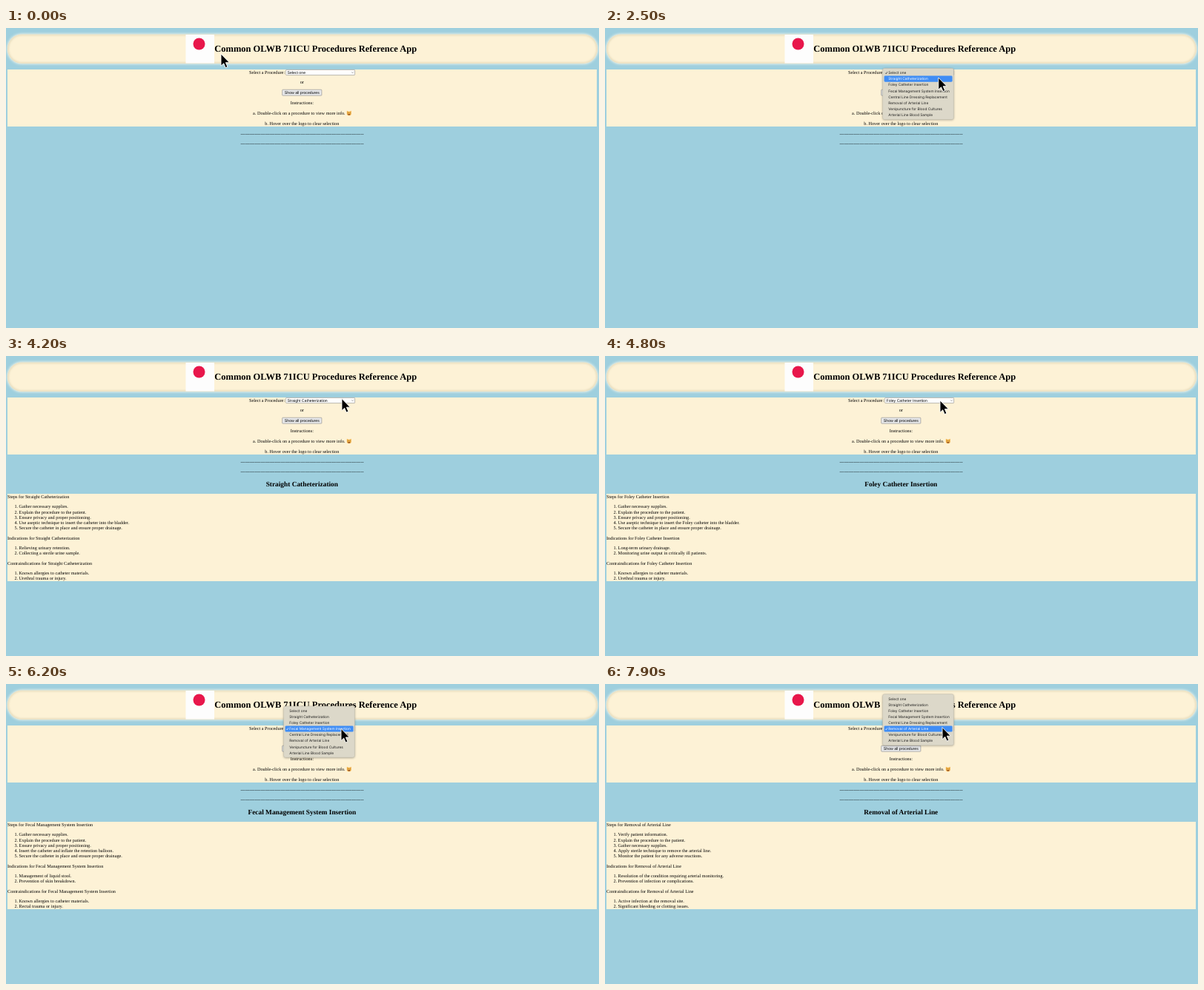
An HTML page that plays this animation: 800 by 405 pixels, repeating every 8000 ms.

```html
<!DOCTYPE html>
<html lang="en">
<head>
<meta charset="utf-8">
<title>Procedures Reference App</title>
<style>
  html, body { margin: 0; width: 100%; height: 100%; overflow: hidden; background: #9ecfde; }
  svg { display: block; width: 800px; height: 405px; }
  text { font: 6.24px "Liberation Serif", Times, serif; text-rendering: geometricPrecision; white-space: pre; }
  .mid { text-anchor: middle; }
  .h1 { font-size: 12.48px; font-weight: bold; }
  .h2 { font-size: 9.36px; font-weight: bold; }
  .ui { font: 5.2px "Liberation Sans", Arial, sans-serif; }
  .menu text { font: 4.8px Inter, sans-serif; }
  .panel { fill: #fdf2d6; }
</style>
</head>
<body>
<svg viewBox="0 0 800 405">
  <defs>
    <filter id="soft" x="-10%" y="-30%" width="120%" height="160%"><feGaussianBlur stdDeviation="1.5"/></filter>
    <clipPath id="pill"><rect x="2" y="8.5" width="796" height="39.5" rx="19.7"/></clipPath>
  </defs>
  <rect width="800" height="405" fill="#9ecfde"/>

  <rect x="1" y="7.5" width="798" height="41.5" rx="20.5" fill="#e6eee6" filter="url(#soft)"/>
  <g clip-path="url(#pill)">
    <rect class="panel" x="2" y="8.5" width="796" height="39.5"/>
    <rect x="2" y="8.5" width="796" height="39.5" rx="19.7" fill="none" stroke="#d9cfae" stroke-width="2" filter="url(#soft)"/>
  </g>
  <rect x="242.5" y="9" width="38.5" height="38.5" fill="#fdfdfd"/>
  <circle cx="260.5" cy="21.5" r="8" fill="#e8174b"/>
  <text class="h1" x="281.3" y="32.4">Common OLWB 71ICU Procedures Reference App</text>

  <rect class="panel" x="2" y="56" width="795" height="77"/>
  <text x="328" y="62">Select a Procedure:</text>
  <rect id="box" x="377.6" y="56.4" width="93" height="7.2" rx=".8" fill="#fff"/>
  <text id="value" class="ui" x="379.5" y="61.8"></text>
  <path d="M466.2 59.4l1.3 1.4 1.3-1.4" fill="none" stroke="#555" stroke-width=".5"/>
  <text class="mid" x="399.3" y="75.4">or</text>
  <rect x="372.7" y="83.2" width="53.2" height="8" rx=".8" fill="#e7e8ea" stroke="#767676" stroke-width=".5"/>
  <text class="ui mid" x="399.3" y="89.1">Show all procedures</text>
  <text class="mid" x="399.3" y="103.3">Instructions:</text>
  <text x="333" y="117.3">a. Double-click on a procedure to view more info.</text>
  <g transform="translate(462.8 115.2)">
    <path d="M-3 0L-2.9-3.4-.9-2.5H.9L2.9-3.4 3 0Q3 3 0 3T-3 0z" fill="#eeae45"/>
    <path d="M-1.9-.4q.5-.8 1 0M.9-.4q.5-.8 1 0" fill="none" stroke="#5a3a18" stroke-width=".5"/>
    <path d="M-1.7.8H1.7Q1.2 2.3 0 2.3T-1.7.8z" fill="#8a4a2a"/>
  </g>
  <text class="mid" x="399.3" y="131.3">b. Hover over the logo to clear selection</text>
  <text class="mid rule" x="399.5" y="144.5"></text>
  <text class="mid rule" x="399.5" y="157.9"></text>

  <g id="details"></g>
  <g id="menu" class="menu"></g>
  <path id="cursor" d="M0 0V16.2L3.7 12.8 6.2 18.6 8.9 17.4 6.4 11.7H11.4z" fill="#000" stroke="#fff" stroke-width=".9" stroke-linejoin="round"/>
</svg>
<script>
const LOOP = 8000, STEP = 100, ROW = 8.14, TOP = 56.4;
const $ = id => document.getElementById(id);

const names = ['Select one', 'Straight Catheterization', 'Foley Catheter Insertion',
  'Fecal Management System Insertion', 'Central Line Dressing Replacement',
  'Removal of Arterial Line', 'Venipuncture for Blood Cultures', 'Arterial Line Blood Sample'];

const gather = 'Gather necessary supplies.', explain = 'Explain the procedure to the patient.',
  privacy = 'Ensure privacy and proper positioning.',
  drain = 'Secure the catheter in place and ensure proper drainage.',
  allergy = 'Known allergies to catheter materials.', trauma = 'Urethral trauma or injury.';

// steps, indications and contraindications per procedure
const info = [null,
  [[gather, explain, privacy, 'Use aseptic technique to insert the catheter into the bladder.', drain],
   ['Relieving urinary retention.', 'Collecting a sterile urine sample.'], [allergy, trauma]],
  [[gather, explain, privacy, 'Use aseptic technique to insert the Foley catheter into the bladder.', drain],
   ['Long-term urinary drainage.', 'Monitoring urine output in critically ill patients.'], [allergy, trauma]],
  [[gather, explain, privacy, 'Insert the catheter and inflate the retention balloon.', drain],
   ['Management of liquid stool.', 'Prevention of skin breakdown.'], [allergy, 'Rectal trauma or injury.']],
  [[gather, explain, privacy, 'Remove the old dressing using aseptic technique.',
    'Apply a new sterile dressing and secure in place.'],
   ['Prevention of infection at the central line site.', 'Maintenance of a sterile field for central line access.'],
   ['Known allergies to dressing materials.', 'Active infection at the site.']],
  [['Verify patient information.', explain, gather, 'Apply sterile technique to remove the arterial line.',
    'Monitor the patient for any adverse reactions.'],
   ['Resolution of the condition requiring arterial monitoring.', 'Prevention of infection or complications.'],
   ['Active infection at the removal site.', 'Significant bleeding or clotting issues.']]];

// menu opens, then the next procedure is picked
const visits = [[2100, 3000], [4300, 4600], [4900, 5400], [6100, 6600], [6800, 7300], [7800, 9000]];

// time, x, y
const path = [[0, 290, 35], [100, 290, 35], [1700, 447.5, 57], [1800, 447.5, 57], [1900, 452.5, 60.5],
  [2200, 452.5, 60.5], [2500, 449.8, 67], [2900, 450, 67], [3000, 452.7, 60.5], [3800, 452.7, 60.5],
  [4200, 453, 57.5], [4300, 453, 58], [4500, 453, 67], [4600, 453, 67], [4800, 452, 60],
  [5000, 452, 60], [5200, 452, 67], [5300, 452, 67], [5400, 452, 60.3], [6200, 452, 60.3],
  [6400, 453, 67], [6500, 453, 67], [6700, 453.5, 59.3], [6900, 453.5, 59.3], [7100, 454, 67],
  [7200, 454, 67], [7400, 455, 58.5], [LOOP, 455, 58.5]];

const text = (x, y, s, extra = '') => `<text x="${x}" y="${y}" ${extra}>${s}</text>`;
const picked = t => visits.filter(v => t >= v[1]).length;

function cursorAt(t) {
  const i = path.findIndex(p => p[0] > t);
  const [a, b] = [path[i - 1], path[i]];
  const u = (t - a[0]) / (b[0] - a[0]), k = u * u * (3 - 2 * u);
  return [a[1] + (b[1] - a[1]) * k, a[2] + (b[2] - a[2]) * k];
}

function detailsMarkup(head, body) {
  if (!head) return '';
  const labels = ['Steps', 'Indications', 'Contraindications'], tops = [191.9, 247.5, 281.6];
  return '<rect class="panel" x="2" y="186" width="795" height="118"/>' +
    text(399.3, 176.2, names[head], 'class="h2 mid"') +
    info[body].map((list, i) => text(2, tops[i], `${labels[i]} for ${names[body]}`) +
      list.map((s, n) => {
        const y = tops[i] + 13.55 + n * 7.15;
        return text(11.4, y, n + 1 + '.') + text(17.6, y, s);
      }).join('')).join('');
}

function menuMarkup(current, hover) {
  const top = TOP - current * ROW;
  const frame = (dy, fill) => `<rect x="374.6" y="${top - 2 + dy}" width="95.8" height="${ROW * 8 + 4}" rx="2.4" ${fill}/>`;
  return frame(.8, 'fill="#000" opacity=".3" filter="url(#soft)"') +
    frame(0, 'fill="#dcd8c9" stroke="#b9b5a6" stroke-width=".4"') +
    names.map((name, i) => {
      const y = top + i * ROW, on = i === hover, ink = on ? '#fff' : '#1c1c1c';
      return (on ? `<rect x="376.6" y="${y}" width="92" height="${ROW}" rx="1.4" fill="#3f8df5"/>` : '') +
        (i === current ? `<path d="M378.4 ${y + 4.3}l.9 1.3 1.6-2.9" fill="none" stroke="${ink}" stroke-width=".6"/>` : '') +
        text(382.3, y + 5.8, name, `fill="${ink}"`);
    }).join('');
}

let shown = '';
function draw(t) {
  const [x, y] = cursorAt(t);
  $('cursor').setAttribute('transform', `translate(${x} ${y})`);
  const current = picked(t), body = picked(t - STEP) || current;
  const open = visits.some(v => t >= v[0] && t < v[1]);
  const hover = current + Math.floor((y - TOP) / ROW);
  const ring = current > 0 && !open && t < visits[current][0] - STEP;
  const key = [current, body, open, hover, ring].join();
  if (key === shown) return;
  shown = key;
  $('value').textContent = names[current];
  $('box').setAttribute('stroke', ring ? '#2f6fd6' : '#767676');
  $('box').setAttribute('stroke-width', ring ? 1.1 : .5);
  $('details').innerHTML = detailsMarkup(current, body);
  $('menu').innerHTML = open ? menuMarkup(current, hover) : '';
}

document.querySelectorAll('.rule').forEach(el => el.textContent = '-'.repeat(80));
const start = performance.now();
function tick() {
  const t = (performance.now() - start) % LOOP;
  draw(Math.floor(t / STEP) * STEP);
  requestAnimationFrame(tick);
}
tick();
</script>
</body>
</html>
```
